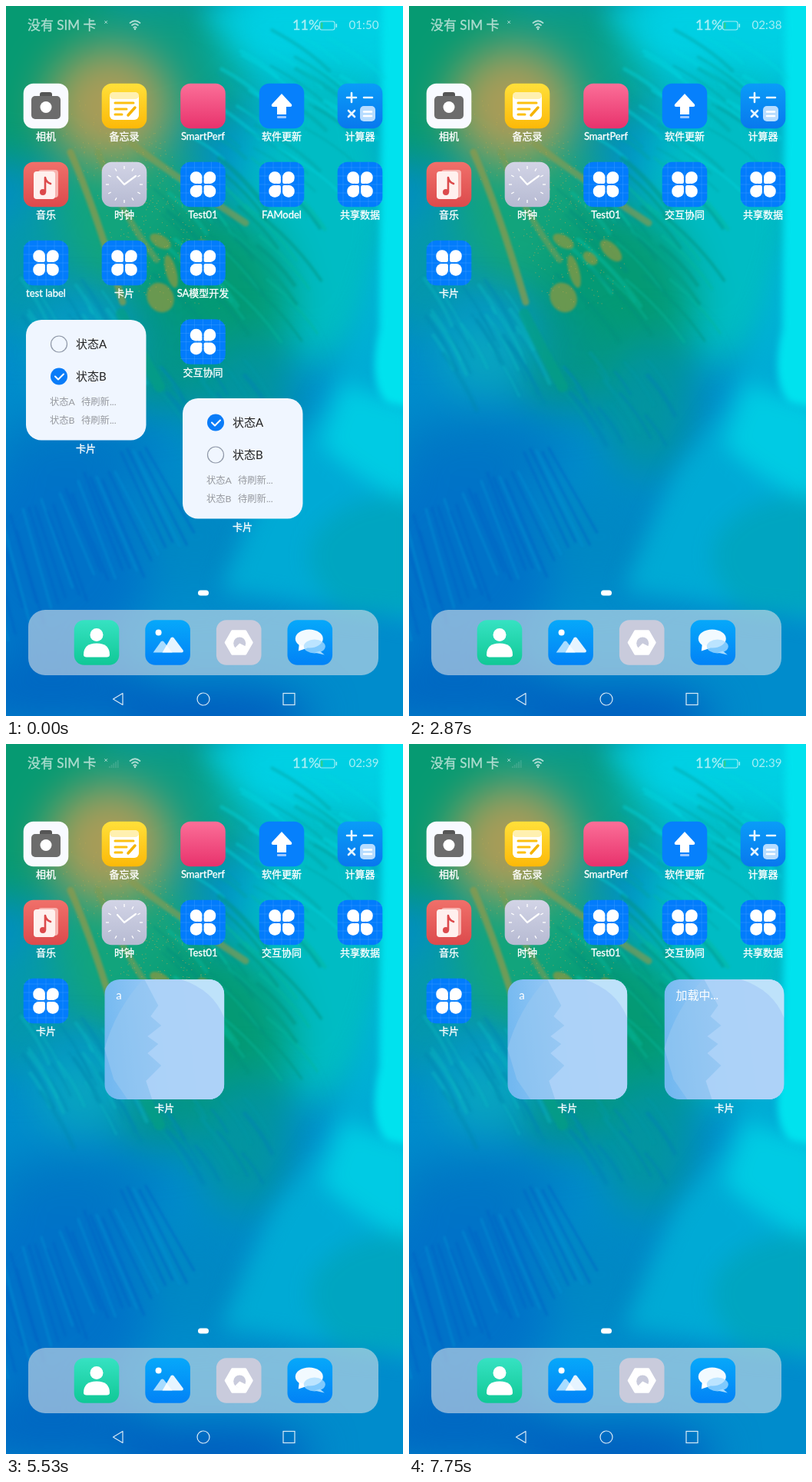
Write an HTML page that moves like this. It is 517x923 px and loops after 8000 ms.

```html
<!DOCTYPE html>
<html lang="zh-CN">
<head>
<meta charset="utf-8">
<title>卡片代理刷新</title>
<style>
html, body { margin: 0; width: 100%; height: 100%; overflow: hidden; background: #fff; }
svg { display: block; width: 100vw; height: 100vh; }
text { font-family: Lato, "Noto Sans CJK SC", "Noto Sans CJK", sans-serif; white-space: pre; }
.medium { stroke: currentColor; stroke-width: .35; }
</style>
</head>
<body>
<svg id="stage" viewBox="0 0 517 923" preserveAspectRatio="none" xmlns="http://www.w3.org/2000/svg"></svg>
<script>
const LOOP = 8000;
const COLS = [52, 154, 256.5, 359, 461];
const ROWS = [130, 232, 334, 436.5];

// --- helpers ---------------------------------------------------------
function seeded(seed) {
  return () => (seed = (seed * 16807) % 2147483647) / 2147483647;
}
const rect = (x, y, w, h, r, fill, extra = '') =>
  `<rect x="${x}" y="${y}" width="${w}" height="${h}" rx="${r}" fill="${fill}" ${extra}/>`;
const circle = (x, y, r, fill, extra = '') =>
  `<circle cx="${x}" cy="${y}" r="${r}" fill="${fill}" ${extra}/>`;
const path = (d, fill, extra = '') => `<path d="${d}" fill="${fill}" ${extra}/>`;
const line = (d, color, width, extra = '') =>
  path(d, 'none', `stroke="${color}" stroke-width="${width}" stroke-linecap="round" stroke-linejoin="round" ${extra}`);
const text = (x, y, size, str, fill, extra = '') =>
  `<text x="${x}" y="${y}" font-size="${size}" fill="${fill}" ${extra}>${str}</text>`;
const centred = (x, y, size, str, fill, medium = true) =>
  text(x, y, size, str, fill, `text-anchor="middle" color="${fill}" ${medium ? 'class="medium"' : ''}`);
const at = (x, y, body) => `<g transform="translate(${x} ${y})">${body}</g>`;
const layer = (id, body) => `<g id="${id}">${body}</g>`;
const gradient = (id, from, to, dir = 'x1="0" y1="0" x2="0" y2="1"') =>
  `<linearGradient id="${id}" ${dir}><stop stop-color="${from}"/><stop offset="1" stop-color="${to}"/></linearGradient>`;
const blur = (id, amount) =>
  `<filter id="${id}" filterUnits="userSpaceOnUse" x="-90" y="-90" width="700" height="1100" color-interpolation-filters="sRGB"><feGaussianBlur stdDeviation="${amount}"/></filter>`;

const defs = `<defs>
  ${blur('soft', 28)}${blur('mist', 14)}${blur('edge', 5)}${blur('hair', 1.4)}
  ${gradient('yellow', '#ffe03a', '#fcb908')}
  ${gradient('pink', '#fb6f98', '#e8326c')}
  ${gradient('blue', '#0a9cf8', '#0878ee')}
  ${gradient('sky', '#06a8fa', '#0282f6')}
  ${gradient('red', '#f0706a', '#dc4a4c')}
  ${gradient('grey', '#d2d4e6', '#b6bad2')}
  ${gradient('green', '#36e2c2', '#10c896')}
  ${gradient('ice', '#72b8f0', '#b0d4fa', 'x1="0" y1=".6" x2=".8" y2=".5"')}
  ${gradient('glass', '#68b3d3', '#6cbbe8', 'x1="0" y1="0" x2="1" y2="0"')}
  <clipPath id="cardClip"><rect width="156" height="156" rx="20"/></clipPath>
</defs>`;

// --- wallpapers ------------------------------------------------------
function wallpaper() {
  const warm = [
    ['#069a72', 20, 60, 150, 150], ['#0a9c84', 215, 70, 120, 100],
    ['#00cce0', 430, 30, 150, 100], ['#00bcc4', 410, 270, 110, 200],
    ['#12a47c', 160, 270, 110, 110], ['#049a74', 270, 390, 100, 130],
    ['#04948c', 190, 460, 60, 70], ['#a89c58', 135, 130, 82, 78], ['#0498ac', 20, 340, 60, 90]
  ];
  const cool = [
    ['#08a4c0', 100, 450, 60, 60], ['#0294a0', 310, 520, 60, 90],
    ['#0078c4', 90, 580, 110, 50], ['#0072c8', 60, 720, 130, 130],
    ['#0088c4', 250, 690, 80, 70], ['#0068c2', 60, 890, 140, 50], ['#005cbe', 270, 925, 130, 40]
  ];
  const blobs = list => `<g filter="url(#soft)">${list.map(([c, x, y, rx, ry]) =>
    `<ellipse cx="${x}" cy="${y}" rx="${rx}" ry="${ry}" fill="${c}"/>`).join('')}</g>`;

  let out = rect(0, 0, 517, 923, 0, '#008ccc') + blobs(warm) + blobs(cool);
  // Bright water to the right of the long curve.
  out += `<g filter="url(#mist)">
    ${path('M540 280 Q482 290 466 370 Q440 490 350 600 Q310 680 280 760 L540 800Z', '#00b4d8', 'opacity=".75"')}
    ${path('M440 490 Q490 510 540 520 V650 Q460 620 410 570Z', '#00d4e8', 'opacity=".8"')}
    ${path('M540 640 Q440 630 400 690 Q380 740 440 790 H540Z', '#00a4bc', 'opacity=".8"')}
    ${path('M250 10 Q300 -10 350 -10 H540 V60 Q420 90 380 70 Q330 80 250 10Z', '#00d4e8', 'opacity=".5"')}
  </g><g filter="url(#edge)">
    ${path('M490 -20 L486 420 Q470 490 496 515 L540 525 V-20Z', '#00e2ee')}
  </g>`;

  // Fibres: count, origin box, mean length, slope (dx, dy), two colours, opacity.
  const rnd = seeded(71);
  function fibres(n, [x, y, w, h], len, [dx, dy], colors, opacity) {
    let s = '';
    for (let i = 0; i < n; i++) {
      const k = len * (.6 + rnd() * .8), px = x + rnd() * w, py = y + rnd() * h;
      s += line(`M${px} ${py} q${k * dx * .6} ${k * dy * .45} ${k * dx} ${k * dy}`,
        colors[i % 2], 2 + rnd() * 4, `opacity="${opacity}"`);
    }
    return s;
  }
  let streaks = fibres(30, [230, 20, 210, 170], 70, [.85, .6], ['#00d4de', '#04a0a0'], .4) +
    fibres(34, [190, 190, 170, 170], 85, [.7, .75], ['#06b89c', '#04907c'], .45) +
    fibres(28, [20, 350, 150, 110], 70, [.5, .85], ['#0ab8c4', '#0288b0'], .4) +
    fibres(16, [200, 430, 120, 110], 60, [.55, .8], ['#0298a8', '#0280b4'], .4);
  for (let i = 0; i < 30; i++) {
    const x = -50 + i * 8, y = 690 - i * 4.5 + rnd() * 30, lean = 25 + i * 1.3;
    streaks += line(`M${x} ${y} l${lean} ${105 + rnd() * 25}`, i % 3 ? '#0062c4' : '#0092d4', 3, 'opacity=".5"');
  }
  // Golden bands and flakes.
  streaks += line('M84 190 Q115 260 152 385', '#8c9a4c', 9, 'opacity=".75"') +
    line('M120 190 Q150 270 196 330', '#7c9c54', 8, 'opacity=".6"') +
    line('M165 180 Q225 225 312 282', '#8a9a50', 9, 'opacity=".65"') +
    line('M150 400 Q175 450 200 495', '#06a080', 14, 'opacity=".6"');
  const flakes = [[201, 306, 15, 8, 30], [215, 345, 7, 22, -15], [236, 328, 11, 7, 40],
    [263, 318, 18, 9, 45], [201, 379, 17, 20, -30]];
  streaks += flakes.map(([x, y, rx, ry, a]) =>
    `<ellipse rx="${rx}" ry="${ry}" transform="translate(${x} ${y}) rotate(${a})" fill="#7c9848" opacity=".85"/>`).join('');
  out += `<g filter="url(#hair)">${streaks}</g>`;
  for (let i = 0; i < 420; i++) {
    const k = rnd(), x = 70 + k * 110 + rnd() * 110, y = 150 + k * 200 + (rnd() - .5) * 100;
    out += rect(x.toFixed(1), y.toFixed(1), 1, 1, 0, '#b8a856', 'opacity=".7"');
  }
  return out;
}

function blurredWallpaper() {
  return rect(0, 0, 517, 923, 0, '#038a68') + `<g filter="url(#edge)">
    ${path('M-20 165 L150 165 Q255 190 262 260 L270 400 L-20 400Z', '#027e7c')}
    ${path('M-20 230 Q110 235 150 290 L270 430 H-20Z', '#04749c')}
    ${path('M408 -20 V530 H540 V-20Z', '#06946e')}
    ${path('M270 455 Q340 400 420 430 L540 470 V600 H260Z', '#048c92')}
    ${path('M415 430 L540 450 V560 H415Z', '#069a94')}
    <ellipse cx="530" cy="350" rx="68" ry="165" fill="#22996f"/>
    <ellipse cx="535" cy="330" rx="36" ry="120" fill="#4a9c74"/>
    ${path('M-20 325 Q120 330 180 430 Q230 460 282 462 L262 575 L185 690 L155 940 H-20Z', '#016cb4')}
    ${path('M282 472 Q400 530 540 552 V940 H155 L162 740 L185 685 L215 655 L262 575Z', '#028ec8')}
    ${path('M282 472 Q400 530 540 552 V690 Q420 620 262 575Z', '#028cb4')}
    ${path('M112 632 L178 562 L262 578 L215 655 L180 690 L138 672Z', '#0576c0')}
    ${path('M-20 450 L65 455 L40 490 L-20 510Z', '#025eae')}
    ${path('M158 780 L230 860 L158 900Z', '#0a8cb4')}
  </g>`;
}

// --- icons, drawn around their centre --------------------------------
const tile = fill => rect(-29.3, -29.3, 58.6, 58.6, 13, fill);
const petal = [[-1, -1], [1, -1], [-1, 1], [1, 1]].map(([x, y]) =>
  rect(x * 8.9 - 7.8, y * 8.9 - 7.8, 15.6, 15.6, 7.2, '#fff') +
  rect(x * 4.6 - 3.5, y * 4.6 - 3.5, 7, 7, 2, '#fff')).join('');
const grid = [-22, -11, 0, 11, 22].map(k =>
  line(`M${k} -29V29M-29 ${k}H29`, '#4aa4ff', .7, 'opacity=".5"')).join('');
const ticks = Array.from({ length: 12 }, (_, i) =>
  `<path d="M0 -24V-20" stroke="#fff" stroke-width="1.3" transform="rotate(${i * 30})"/>`).join('');
const hexagon = Array.from({ length: 6 }, (_, i) =>
  `${17 * Math.cos(i * Math.PI / 3)},${17 * Math.sin(i * Math.PI / 3)}`).join(' ');

const icons = {
  camera: tile('#f8faff') + rect(-8, -18, 16, 10, 3, '#555') + rect(-19, -13, 38, 30, 5, '#6c6c6c') +
    circle(0, 1.5, 7.5, '#fff'),
  notes: tile('url(#yellow)') + rect(-19, -18, 38, 36, 6, '#fff') + rect(-19, -18, 38, 9, 5, '#fff0b0') +
    line('M-12 -4H12M-12 4H3M-12 11H-3', '#fcc010', 3) + line('M5 12L14 2', '#f5b300', 3.5),
  perf: tile('url(#pink)'),
  update: tile('#0680fc') + path('M0 -16L13 -2Q14 1 11 1H6V11H-6V1H-11Q-14 1 -13 -2Z', '#fff') +
    rect(-6, 13, 12, 3, 1, '#9cc8ff'),
  calc: tile('url(#blue)') + line('M-17 -11H-5M-11 -17V-5M5 -11H16M-15 6L-7 14M-7 6L-15 14', '#e6f5ff', 2.6) +
    rect(0, 0, 20, 20, 5, '#b6dcff') + line('M5 7.5H15M5 13H15', '#fff', 2.6),
  music: tile('url(#red)') + rect(-10, -19, 26, 36, 4, '#f8b4b0') + rect(-16, -17, 28, 36, 4, '#fff0ee') +
    line('M-1 10V-9Q0 -3 6 -1', '#dc4a4c', 2.6) + circle(-4, 10, 4, '#dc4a4c'),
  clock: tile('url(#grey)') + ticks + line('M-9 -10L0 0L15 -11', '#fff', 2.2),
  petal: tile('#027cfc') + grid + petal,
  contact: tile('url(#green)') + circle(0, -10, 8.5, '#fff') +
    path('M-17 16Q-17 1 0 1Q17 1 17 16Q17 19 13 19H-13Q-17 19 -17 16Z', '#fff'),
  gallery: tile('url(#sky)') + circle(-12, -13, 4, '#fff') +
    path('M-19 13L-9 -1Q-7 -3 -5 -1L6 13Z', '#a8dcff') + path('M-7 13L4 -6Q6 -8 8 -6L20 10Q21 13 18 13Z', '#fff', 'opacity=".9"'),
  settings: tile('#c9cbdc') + `<polygon points="${hexagon}" fill="#fff" stroke="#fff" stroke-width="3" stroke-linejoin="round"/>` +
    circle(1, 1, 8, '#c9cbdc') + path('M-5 7L1 1L9 5L7 13Z', '#fff'),
  chat: tile('url(#sky)') + path('M-14 2L-15 11L-3 7Z', '#fff') +
    `<ellipse cx="-1" cy="-5" rx="18" ry="12" fill="#fff" opacity=".95"/>` +
    `<ellipse cx="6" cy="5" rx="14" ry="9" fill="#a8dcff" opacity=".75"/>` + path('M13 11L19 16L6 13Z', '#a8dcff')
};

const app = (col, row, name, label) => at(COLS[col], ROWS[row], icons[name]) +
  centred(COLS[col], ROWS[row] + 44, 13, label, '#fff');
const petals = list => list.map(([c, r, label]) => app(c, r, 'petal', label)).join('');

// --- home screen -----------------------------------------------------
const commonApps = app(0, 0, 'camera', '相机') + app(1, 0, 'notes', '备忘录') +
  app(2, 0, 'perf', 'SmartPerf') + app(3, 0, 'update', '软件更新') +
  app(4, 0, 'calc', '计算器') + app(0, 1, 'music', '音乐') + app(1, 1, 'clock', '时钟') +
  petals([[2, 1, 'Test01'], [4, 1, '共享数据']]);

const dock = rect(29, 785, 456, 85, 22, '#dce2e8', 'opacity=".58"') +
  ['contact', 'gallery', 'settings', 'chat'].map((n, i) => at(118 + i * 92.6, 827.5, icons[n])).join('');

const radio = (y, on, label) => (on
  ? circle(43, y, 11, '#0a7cf8') + line(`M38 ${y}l4 4l7 -7`, '#fff', 2)
  : circle(43, y, 10.5, 'none', 'stroke="#8f98a8" stroke-width="1.2"')) +
  text(65, y + 5.3, 15, label, '#222');
const waiting = (y, label) => text(31, y, 12.3, label, '#96999f') + text(72, y, 12.3, '待刷新...', '#96999f');
const stateCard = (x, y, a) => at(x, y, rect(0, 0, 156.5, 156.5, 20, '#f0f6ff') +
  radio(31.5, a, '状态A') + radio(73.5, !a, '状态B') +
  waiting(111, '状态A') + waiting(135, '状态B') + centred(78, 172, 13, '卡片', '#fff'));

const iceCard = label => `<g clip-path="url(#cardClip)">` + rect(0, 0, 156, 156, 0, 'url(#ice)') +
  path('M0 90Q14 40 50 0H156V156H30L12 130Z', '#98c8f2', 'opacity=".6"') +
  path('M52 0H156V156H62L54 132L74 112L56 96L70 84L56 74L74 60L60 48L70 34Z', '#b0d4fa', 'opacity=".85"') +
  path('M100 0H156V50Q142 14 100 0Z', '#c4e6fc', 'opacity=".8"') + '</g>' +
  text(15, 26, 15, label, '#fff');
const homeCard = (id, x, label) => layer(id, at(x, 306, iceCard(label) + centred(78, 172, 13, '卡片', '#fff')));

const home = layer('home', wallpaper() + commonApps +
  layer('before', petals([[3, 1, 'FAModel'], [0, 2, 'test label'], [1, 2, '卡片'], [2, 2, 'SA模型开发'], [2, 3, '交互协同']]) +
    stateCard(26, 408, false) + stateCard(230, 510, true)) +
  layer('after', petals([[3, 1, '交互协同'], [0, 2, '卡片']])) +
  homeCard('cardOne', 128.3, 'a') + homeCard('cardTwo', 332.5, '加载中...') +
  rect(250, 759.5, 14, 7, 3.5, '#fff') + dock);

// --- app page --------------------------------------------------------
const button = (y, label) => rect(31, y, 452, 52, 26, '#007ffe') + centred(257, y + 32.3, 17.4, label, '#fff');
const page = layer('page', rect(0, 0, 517, 923, 0, '#fff') +
  text(105, 436.5, 21.8, '基于过程数据的卡片代理刷新:', '#333') + button(448, '更新过程数据') +
  text(94, 578, 21.8, '基于持久化数据的卡片代理刷新:', '#333') + button(589.7, '更新持久化数据'));

// --- widget picker ---------------------------------------------------
function choice(id, current, y, label, lines) {
  let dots = '';
  for (let i = 0; i < 14; i++) {
    if (i !== current) dots += circle(152.5 + i * 16, 671, 3, '#0468a8', `opacity="${i < current ? .5 : .08}"`);
  }
  const card = `<g transform="translate(184 ${y}) scale(.933)">${iceCard(label)}</g>`;
  return layer(id, lines.map((s, i) => centred(256, 148 + i * 21, 17.3, s, '#fff', false)).join('') +
    card + dots + rect(227 + (current - 5) * 15.4, 667.5, 14, 7, 3.5, '#fff'));
}
const picker = layer('picker', blurredWallpaper() +
  line('M46 55H25M34 46L25 55L34 64', '#fff', 1.8) + centred(257, 116.5, 21, '卡片', '#fff') +
  choice('choiceA', 5, 324, 'a', ['This is a service widget update by proxy using', 'persistent data.']) +
  choice('choiceB', 6, 303, '加载中...', ['Widget update by proxy with process data']) +
  rect(92, 832, 331, 43, 21.5, 'url(#glass)', 'stroke="#8fcbe8" stroke-width="1"') +
  centred(257, 860, 19.4, '添加到桌面', '#fff'));

// --- system bars -----------------------------------------------------
const ink = 'currentColor';
const bars = [0, 1, 2, 3, 4].map(i => rect(134 + i * 2.7, 29 - i * 2, 1.8, 2 + i * 2, 0, ink)).join('');
const statusBar = layer('status', text(28, 30.8, 17, '没有 SIM 卡', ink, 'class="medium"') +
  line('M128.7 19.5l3 3m0 -3l-3 3', ink, 1) + `<g id="signal" opacity=".2">${bars}</g>` +
  line('M161.5 22Q168 16.5 174.5 22M164 25Q168 21.5 172 25M166.3 28Q168 26.5 169.7 28', ink, 1.7) +
  circle(168, 30, 1.3, ink) + text(373, 31, 18, '11%', ink, 'class="medium"') +
  rect(408.5, 20, 19.5, 11, 2.5, 'none', `stroke="${ink}" stroke-width="1.1"`) +
  rect(429.5, 23, 1.6, 5, .8, ink) + rect(410, 21.5, 2.5, 8, 1, '#4cd060') +
  text(446.5, 30.2, 15.2, '', ink, 'id="time"'));
const navBar = layer('nav', line('M139.5 901L152 893.5V908.5Z', ink, 1.2) +
  circle(257, 901, 8, 'none', `stroke="${ink}" stroke-width="1.2"`) +
  rect(361, 893.5, 15, 15, 0, 'none', `stroke="${ink}" stroke-width="1.2"`));

document.getElementById('stage').innerHTML = defs + home + page + picker + statusBar + navBar;

// --- timeline --------------------------------------------------------
const el = {};
document.querySelectorAll('#stage [id]').forEach(n => { el[n.id] = n; });
const show = (id, on) => { el[id].style.display = on ? '' : 'none'; };
const within = (t, a, b) => t >= a && t < b;

function render(t) {
  const onPage = within(t, 2000, 2870);
  const leaving = within(t, 2740, 2870);
  const onPicker = within(t, 3850, 5380) || within(t, 6090, 7750);
  const mixing = within(t, 3850, 3970) || within(t, 6090, 6240) || within(t, 7620, 7750);

  show('home', !(onPage && !leaving) && !(onPicker && !mixing));
  show('before', t < 890);
  show('after', t >= 890);
  show('cardOne', t >= 5380);
  show('cardTwo', t >= 7620);

  show('page', onPage);
  el.page.setAttribute('transform', leaving ? 'translate(258.5 461.5) scale(.7) translate(-258.5 -461.5)' : '');
  el.page.setAttribute('opacity', leaving ? .6 : 1);

  show('picker', onPicker);
  el.picker.setAttribute('opacity', mixing ? .5 : 1);
  show('choiceA', t < 6650);
  show('choiceB', t >= 6650);

  const dark = onPage && !leaving;
  el.status.style.color = dark ? '#4c4c4c' : '#fff';
  el.status.setAttribute('opacity', dark ? 1 : onPicker ? .75 : .65);
  el.nav.style.color = dark ? '#222' : '#fff';
  el.nav.setAttribute('opacity', dark ? 1 : .85);
  show('signal', dark || t >= 3850);
  el.time.textContent = t < 890 ? '01:50' : t < 2590 ? '02:37' : t < 3850 ? '02:38' : '02:39';
}

const start = performance.now();
function tick() {
  render((performance.now() - start) % LOOP);
  requestAnimationFrame(tick);
}
tick();
</script>
</body>
</html>
```
